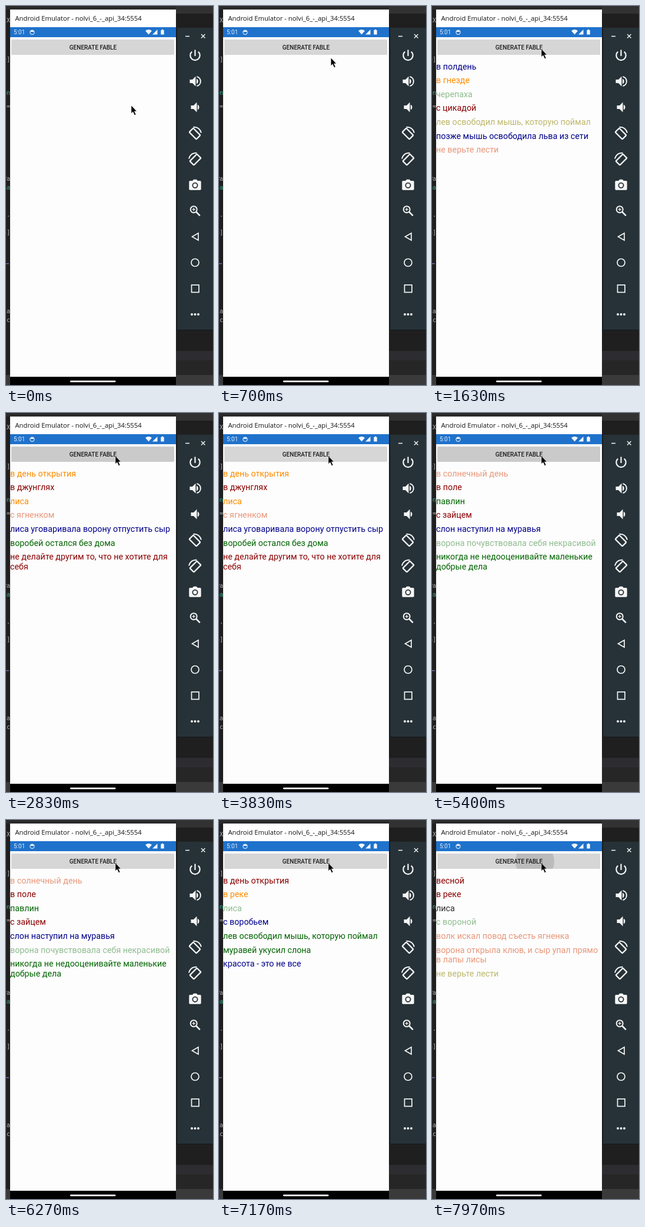
These frames come from a looping animation (352 px wide and 644 px high, 8 s). An HTML page:

```html
<!DOCTYPE html>
<html lang="ru">
<head>
<meta charset="utf-8">
<title>Fable generator</title>
<style>
html, body { margin: 0; width: 100%; height: 100%; overflow: hidden; background: #1f1f1f; }
svg { display: block; width: 100%; height: 100%; }
.title { font: 11.25px "Open Sans", sans-serif; fill: #101010; }
.clock { font: 10px Roboto, sans-serif; fill: #e6eef8; }
.label { font: 500 10px Roboto, sans-serif; fill: #1c1c1c; text-anchor: middle; }
.fable { font: 14.3px Roboto, sans-serif; }
.code { font: 10px "DejaVu Sans Mono", monospace; fill: #b4b4b4; text-anchor: end; }
.icon { fill: none; stroke: #f6f6f6; stroke-width: 1.7; }
.icon .solid { fill: #f6f6f6; stroke: none; }
</style>
</head>
<body>
<svg viewBox="0 0 352 644">
  <defs>
    <clipPath id="buttonClip"><rect x="9" y="57" width="277" height="26" rx="1.5"/></clipPath>
    <clipPath id="stripClip"><rect width="7" height="644"/></clipPath>
  </defs>

  <rect width="352" height="644" fill="#1f1f1f"/>
  <rect width="352" height="6" fill="#2a2a2a"/>
  <rect x="289" width="63" height="13" fill="#323232"/>
  <rect x="289" y="586" width="63" height="16" fill="#2d2d31"/>
  <rect x="289" y="602" width="63" height="25" fill="#262626"/>
  <rect x="289" y="627" width="63" height="17" fill="#3a3a3a"/>
  <rect y="627" width="7" height="17" fill="#3a3a3a"/>
  <g id="strip" class="code" clip-path="url(#stripClip)">
    <rect y="437" width="5" height="1.5" fill="#7566a8"/>
  </g>

  <rect x="7" y="6" width="282" height="30" fill="#fff"/>
  <text class="title" x="15.5" y="25">Android Emulator - nolvi_6_-_api_34:5554</text>

  <rect x="7" y="36" width="282" height="594" fill="#fdfdfd"/>
  <rect x="7" y="36" width="282" height="17" fill="#1f72cb"/>
  <text class="clock" x="13" y="48.3">5:01</text>
  <g fill="#f2f6fc">
    <circle cx="44.5" cy="44.8" r="3.6" fill="none" stroke="#dce8f6" stroke-width="1.2"/>
    <path d="M41.2 44a3.6 3.6 0 0 1 6.6 0z"/>
    <path d="M237 42.2q5.5-4.2 11 0L242.5 48.5z"/>
    <path d="M257.5 40v8.5H249z"/>
    <path d="M263.3 41h1.5v-1.2h2.4V41h1.5v7.5h-5.4z"/>
  </g>

  <rect x="9" y="57" width="277" height="26" rx="1.5" fill="#d6d6d6"/>
  <g clip-path="url(#buttonClip)"><circle id="ripple" cy="70" fill="#888"/></g>
  <text class="label" x="148" y="73.7">GENERATE FABLE</text>
  <g id="fable" class="fable"></g>

  <rect x="7" y="630" width="282" height="14" fill="#000"/>
  <rect x="109" y="636.5" width="77.5" height="2.8" rx="1.4" fill="#fff"/>

  <rect x="291" y="37" width="61" height="513" fill="#263238"/>
  <path d="M290.5 37V550.5H352" fill="none" stroke="#12181b"/>
  <g class="icon">
    <path d="M305 51.5h7M332 48l6.5 6.5m0-6.5L332 54.5" stroke-width="1.4"/>
    <g transform="translate(321.5 84)" stroke-width="2.2">
      <path d="M0-9.5V1M-5.3-6.3a8.2 8.2 0 1 0 10.6 0"/>
    </g>
    <g transform="translate(321.5 128)">
      <path class="solid" d="M-9-3h4.5L1-8.5v17L-4.5 3H-9z"/>
      <path class="solid" d="M2.5-4.5a5 5 0 0 1 0 9z"/>
      <path d="M3-8a8.2 8.2 0 0 1 0 16" stroke-width="2"/>
    </g>
    <g transform="translate(321.5 172)">
      <path class="solid" d="M-7-3h4.5L3-8.5v17L-2.5 3H-7z"/>
      <path class="solid" d="M4.3-4.5a5 5 0 0 1 0 9z"/>
    </g>
    <g id="rotate" transform="translate(321.5 216)" stroke-width="2.3">
      <rect x="-4.8" y="-8.5" width="9.6" height="17" rx="1" transform="translate(-.5 1) rotate(-45)"/>
      <path d="M-3-10.3Q7.500-11 10.500-.5" stroke-width="2"/>
    </g>
    <use href="#rotate" transform="matrix(-1 0 0 1 643 44)"/>
    <g transform="translate(321.5 304)">
      <path class="solid" fill-rule="evenodd" d="M-8.5-7h4.2l1.8-2.2h5L4.3-7h4.2q1.7 0 1.7 1.7V7q0 1.7-1.7 1.7h-17q-1.7 0-1.7-1.7V-5.3q0-1.7 1.7-1.7zM0-4.2a5 5 0 1 0 .01 0z"/>
      <circle class="solid" cy=".8" r="3.2"/>
    </g>
    <g transform="translate(321.5 348)">
      <circle cx="-2.3" cy="-2.3" r="5.5" stroke-width="2"/>
      <path d="M2 2l6.3 6.3" stroke-width="2.5"/>
      <path d="M-5-2.3h5.4M-2.3-5V.4" stroke-width="1.3"/>
    </g>
    <path d="M327 386v12l-10.5-6z"/>
    <circle cx="321.5" cy="436" r="6.5"/>
    <rect x="315.5" y="474" width="12.5" height="12.5"/>
    <path d="M316 524h11.1" stroke-width="4" stroke-linecap="round" stroke-dasharray="0 5.5"/>
  </g>

  <path id="cursor" d="M0 0V13.5L3 10.7L5.6 16.5L7.9 15.5L5.3 9.9H9.3z" fill="#000" stroke="#fff" stroke-width=".5"/>
</svg>

<script>
const LOOP = 8000;
const $ = id => document.getElementById(id);
const clamp = v => Math.max(0, Math.min(1, v));
const mix = (a, b, k) => a + (b - a) * k;
const smooth = k => k * k * (3 - 2 * k);

const ink = {
  o: 'darkorange', s: 'darksalmon', r: 'darkred', b: 'darkblue',
  g: 'darkgreen', p: 'darkseagreen', k: 'darkkhaki', n: '#2c2c2c'
};

// Press time, one colour key per paragraph, paragraphs ("|" wraps a line).
const fables = [
  [1100, 'boprkbs', ['в полдень', 'в гнезде', 'черепаха', 'с цикадой',
    'лев освободил мышь, которую поймал', 'позже мышь освободила льва из сети', 'не верьте лести']],
  [2580, 'orosbgr', ['в день открытия', 'в джунглях', 'лиса', 'с ягненком',
    'лиса уговаривала ворону отпустить сыр', 'воробей остался без дома',
    'не делайте другим то, что не хотите для|себя']],
  [5150, 'srgrbpg', ['в солнечный день', 'в поле', 'павлин', 'с зайцем',
    'слон наступил на муравья', 'ворона почувствовала себя некрасивой',
    'никогда не недооценивайте маленькие|добрые дела']],
  [6500, 'ropbggb', ['в день открытия', 'в реке', 'лиса', 'с воробьем',
    'лев освободил мышь, которую поймал', 'муравей укусил слона', 'красота - это не все']],
  [7900, 'rrnpssk', ['весной', 'в реке', 'лиса', 'с вороной',
    'волк искал повод съесть ягненка',
    'ворона открыла клюв, и сыр упал прямо|в лапы лисы', 'не верьте лести']]
];

const svgText = (parent, x, y, text, fill) => {
  const node = document.createElementNS('http://www.w3.org/2000/svg', 'text');
  node.setAttribute('x', x);
  node.setAttribute('y', y);
  if (fill) node.style.fill = fill;
  node.textContent = text;
  parent.append(node);
};

const snippets = [
  [28, 'X'], [94, 'e]'], [151, 'on', '#3bb08f'], [174, '='], [297, 'Pa'],
  [312, 'ea', '#3bb08f'], [358, ').'], [388, 'a]'], [522, 'ca'], [537, 'ic']
];
for (const [y, text, fill] of snippets) svgText($('strip'), 7, y, text, fill);

let shown = -1;
function showFable(index) {
  if (index === shown) return;
  shown = index;
  const box = $('fable');
  box.textContent = '';
  if (index < 0) return;
  const [, colors, paragraphs] = fables[index];
  let y = 107.5;
  paragraphs.forEach((paragraph, i) => {
    paragraph.split('|').forEach((line, j) => {
      if (j) y += 16.8;
      svgText(box, 7, y, line, ink[colors[i]]);
    });
    y += 23.6;
  });
}

function drawRipple(age) {
  const k = clamp(age / 225);
  const ripple = $('ripple');
  ripple.setAttribute('cx', mix(187, 148, k));
  ripple.setAttribute('r', 142 * k ** 1.25);
  const fade = age < 250
    ? mix(0.35, 0.16, clamp((age - 100) / 150))
    : 0.16 * (1 - clamp((age - 270) / 200));
  ripple.setAttribute('opacity', age < 0 ? 0 : fade);
}

function draw(t) {
  const move = smooth(clamp((t - 100) / 800));
  $('cursor').setAttribute('transform', `translate(${mix(213, 186, move)} ${mix(169, 73, move)})`);
  const pressed = fables.findLastIndex(f => t >= f[0]);
  drawRipple(pressed < 0 ? -1 : t - fables[pressed][0]);
  showFable(fables.findLastIndex(f => t >= f[0] + 50));
}

let start;
function tick(now) {
  start ??= now;
  draw((now - start) % LOOP);
  requestAnimationFrame(tick);
}
draw(0);
requestAnimationFrame(tick);
</script>
</body>
</html>
```
